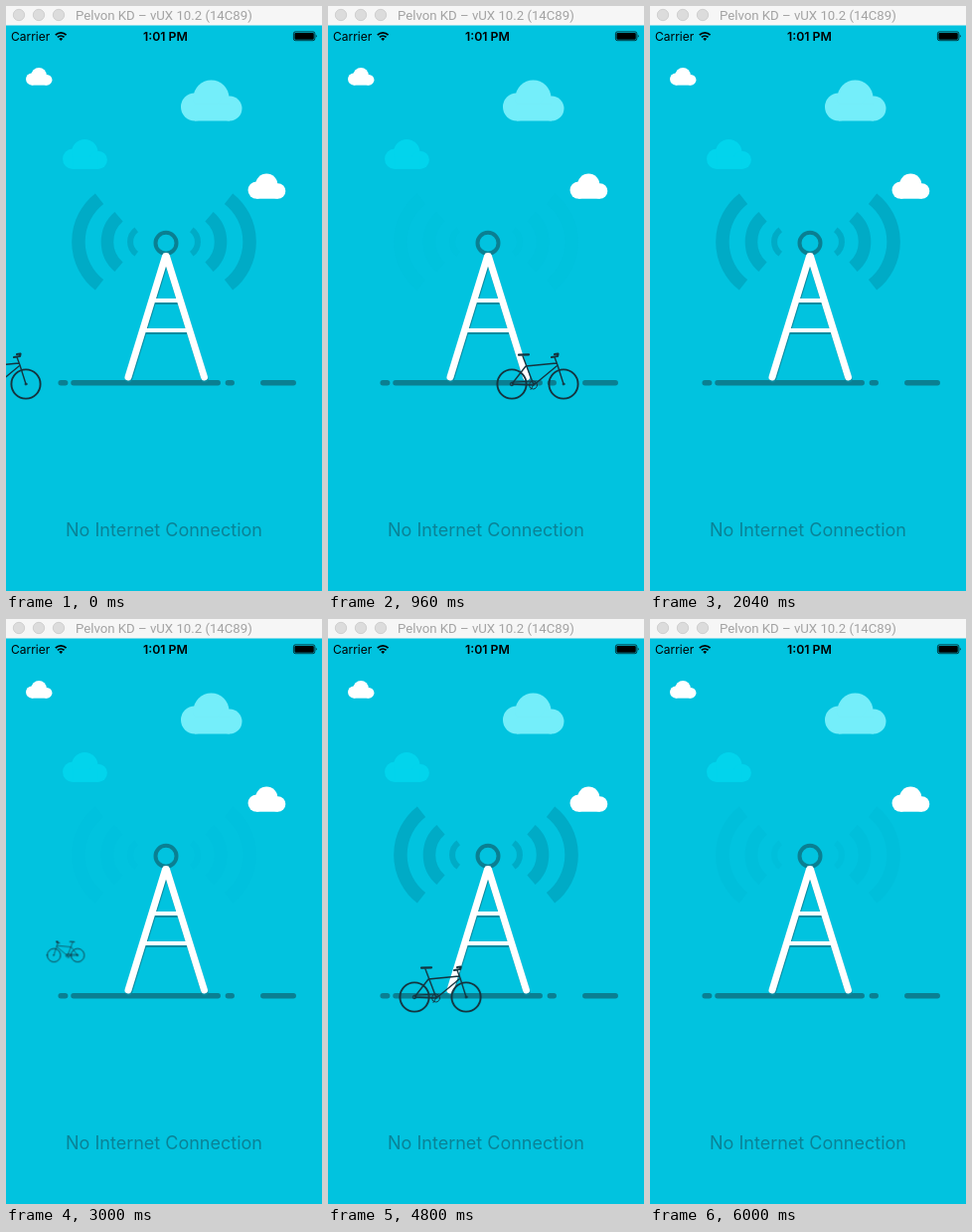
Write an HTML page that moves like this. It is 318 px wide and 588 px high and loops after 6.12 s.

```html
<!DOCTYPE html>
<html lang="en">
<head>
<meta charset="utf-8">
<title>No Internet Connection</title>
<style>
  html, body { margin: 0; width: 100%; height: 100%; overflow: hidden; background: #01c3df; }
  svg { display: block; width: 318px; height: 588px; }
  text { font-family: Inter, "Open Sans", sans-serif; }
  .title { font: 13.2px Roboto, sans-serif; fill: #a3a3a3; }
  .line { fill: none; stroke-linecap: round; stroke-linejoin: round; }

  .waves { animation: fade 6120ms infinite ease-in-out; }
  .ride { animation: ride 6120ms infinite; }
  .back { animation: back 6120ms infinite; }

  @keyframes fade {
    0%, 32.68%, 65.36% { opacity: 1; }
    16.34%, 49.02% { opacity: .05; }
    77.94% { opacity: 1; }
    94.28% { opacity: .04; animation-timing-function: linear; }
    100% { opacity: .22; }
  }
  /* The bikes advance once every 120 ms. */
  @keyframes ride {
    0% { transform: translate(20px, 380px); animation-timing-function: steps(14); }
    27.451% { transform: translate(399.7px, 380px); animation-timing-function: step-end; }
    66.667% { transform: translate(-23.7px, 380px); animation-timing-function: steps(17); }
    100% { transform: translate(437.3px, 380px); }
  }
  @keyframes back {
    0% { transform: translate(327px, 338px); animation-timing-function: step-end; }
    33.333% { transform: translate(327px, 338px); animation-timing-function: steps(11); }
    54.902% { transform: translate(-56.4px, 338px); animation-timing-function: step-end; }
    100% { transform: translate(-56.4px, 338px); }
  }
</style>
</head>
<body>
<svg viewBox="0 0 318 588">
  <defs>
    <g id="cloud">
      <circle cx="14" cy="27" r="14"/>
      <circle cx="30.5" cy="18" r="18"/>
      <circle cx="49" cy="28.5" r="12.5"/>
      <path d="M14 24H49V41H14Z"/>
    </g>
    <!-- Arcs open towards the antenna at x = 0 -->
    <g id="arcs" fill="none" stroke="#00abc6">
      <path stroke-width="13.5" d="M-65 -43.3A55 55 0 0 0 -65 43.3"/>
      <path stroke-width="12.5" d="M-45.5 -25.3A33.5 33.5 0 0 0 -45.5 25.3"/>
      <path stroke-width="6" d="M-27.8 -12.1A15 15 0 0 0 -27.8 12.1"/>
    </g>
    <g id="tower" class="line">
      <path stroke-width="7" d="M123 373L160.5 251.5H161.5L199.5 373"/>
      <path stroke-width="4" d="M149 296H174M140 326H183"/>
    </g>
    <!-- Origin at the front hub -->
    <g id="bike" class="line" stroke="#15343f">
      <g stroke-width="1.9">
        <circle r="14.6"/>
        <circle cx="-52" r="14.6"/>
      </g>
      <path stroke-width="1.4" d="M0 0L-6 -19L-9 -27M-7 -21L-38 -18L-52 0L-30 1L-7 -18M-30 1L-41 -28"/>
      <path stroke-width="2.2" d="M-45 -29.3L-35 -29.6M-12 -27L-6 -28L-5.5 -30.5L-9 -30"/>
      <g stroke-width="1">
        <circle cx="-30.5" cy="1" r="4"/>
        <circle cx="-52" r="1.8"/>
        <circle r="1"/>
        <path d="M-33 5.5L-28 -3M-52 -1.8L-31 -3"/>
      </g>
    </g>
  </defs>

  <rect width="318" height="588" fill="#01c3df"/>

  <rect width="318" height="19.5" fill="#f6f6f6"/>
  <g fill="#dcdcdc" stroke="#cacaca" stroke-width=".8">
    <circle cx="13" cy="9" r="5.7"/>
    <circle cx="33" cy="9" r="5.7"/>
    <circle cx="53" cy="9" r="5.7"/>
  </g>
  <text class="title" x="70" y="14">Pelvon KD – vUX 10.2 (14C89)</text>

  <text x="5" y="35" font-size="12">Carrier</text>
  <text x="160.5" y="35" font-size="12.3" font-weight="600" text-anchor="middle">1:01 PM</text>
  <g fill="none" stroke="#000" stroke-width="1.7">
    <path d="M49.8 29.1A7.6 7.6 0 0 1 60.6 29.1M51.9 31.4A4.7 4.7 0 0 1 58.5 31.4"/>
    <path fill="#000" stroke="none" d="M55.2 35L53.3 32.9A2.6 2.6 0 0 1 57.1 32.9Z"/>
  </g>
  <rect x="289.4" y="25.9" width="21.4" height="8.8" rx="1.8" fill="none" stroke="#000" stroke-width=".7"/>
  <rect x="290.4" y="26.9" width="19.4" height="6.8" rx="1"/>
  <path d="M311.8 28.6Q313.6 30.3 311.8 32Z"/>

  <use href="#cloud" transform="translate(20 62) scale(.43)" fill="#fff"/>
  <use href="#cloud" transform="translate(176 74.5)" fill="#74eefa"/>
  <use href="#cloud" transform="translate(57 134) scale(.73)" fill="#02d4ec"/>
  <use href="#cloud" transform="translate(243.5 168.5) scale(.615)" fill="#fff"/>

  <g class="waves">
    <use href="#arcs" transform="translate(159 237)"/>
    <use href="#arcs" transform="translate(159 237) scale(-1 1)"/>
  </g>

  <path class="line" stroke="#0a7f92" stroke-width="5.5" d="M55.2 378.8H59.6M68 378.8H213.2M223.4 378.8H227.2M258.8 378.8H289.2"/>
  <circle cx="161" cy="238.3" r="10.5" fill="none" stroke="#0a7f92" stroke-width="4"/>
  <use href="#tower" stroke="#0a8ba0" transform="translate(.5 2)"/>
  <use href="#tower" stroke="#fff"/>

  <g class="ride"><use href="#bike"/></g>
  <g class="back"><use href="#bike" transform="scale(-.46 .46)"/></g>

  <text x="159" y="533" font-size="18" fill="#0a8296" text-anchor="middle">No Internet Connection</text>
</svg>
</body>
</html>
```
